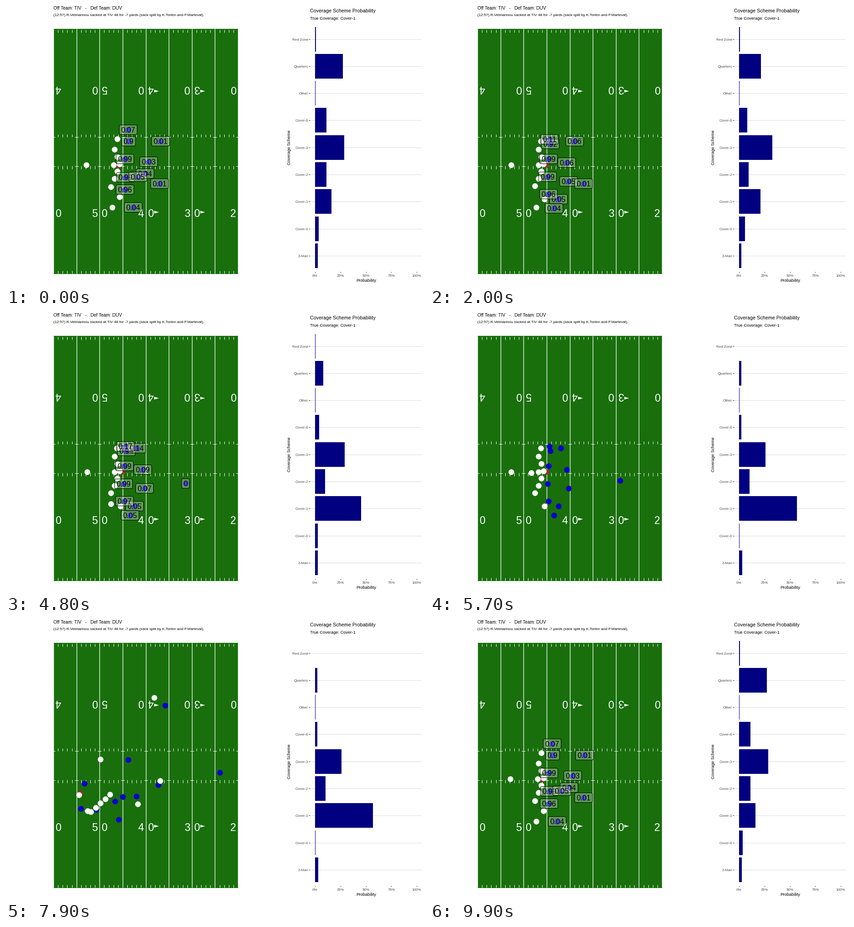
Recreate the animation shown at these times as a matplotlib script. Size 917 px wide and 611 px high, loop 10000 ms.

```python
import matplotlib.pyplot as plt
import numpy as np
from matplotlib.animation import FuncAnimation
from matplotlib.patches import FancyBboxPatch, Polygon, Rectangle

W, H, DPI = 917, 611, 64
PT = 72 / DPI
FRAMES, STEP = 100, 100
SNAP, SACK = 5.7, 7.9
GREEN, BLUE, BROWN, NAVY = "#196f0c", "#0000cd", "#a52a2a", "#000080"
LEFT, RIGHT, TOP, BOTTOM = 104, 509, 50, 587
YARD = (RIGHT - LEFT) / 40
PILE = np.array((165, 425))
ZERO, PERCENT = 678, 2.23

plt.rcParams["font.family"] = "Liberation Sans"
fig = plt.figure(figsize=(W / DPI, H / DPI), dpi=DPI, facecolor="white")
ax = fig.add_axes([0, 0, 1, 1])
ax.set(xlim=(0, W), ylim=(H, 0))
ax.axis("off")


def write(x, y, s, size, **kw):
    """Text on a pixel baseline, size in pixels."""
    kw = {"color": "black", "va": "baseline", "rotation_mode": "anchor", **kw}
    return ax.text(x, y, s, fontsize=size * PT, **kw)


def line(x, y, color="white", width=1.0, z=2):
    ax.plot(x, y, color=color, lw=width * PT, zorder=z, solid_capstyle="butt")


class Player:
    """Shifts into position, runs a curved route at the snap, then follows up.

    Without a bend the route is straight, speeding up from rest.
    """

    def __init__(self, start, ready, end, bend=None, shift=(0, 2), odds=(0, 0)):
        points = (start, ready, end, ready if bend is None else bend)
        self.start, self.ready, self.end, self.bend = np.array(points, float)
        self.shift, self.odds = shift, odds

    def at(self, t):
        if t < SNAP:
            return self.start + (self.ready - self.start) * np.interp(t, self.shift, (0, 1))
        u = min((t - SNAP) / (SACK - SNAP), 1)
        p = (1 - u) ** 2 * self.ready + 2 * u * (1 - u) * self.bend + u * u * self.end
        late = max(t - SACK, 0)
        if self.end[0] > 260:   # downfield: run on and slow down
            speed = 2 * (self.end - self.bend) / (SACK - SNAP)
            return p + speed * 0.7 * (1 - np.exp(-late / 0.7))
        return p + (PILE - p) * 0.5 * (1 - np.exp(-late))

    def label(self, t):
        return f"{round(float(np.interp(t, (0, 4.8), self.odds)), 2):g}"


def offensive_line():
    """Five blockers in a wedge who slide down and trail the quarterback."""
    ends = np.linspace((228, 382), (186, 420), 5)
    for i, end in enumerate(ends):
        x, y = 249 - 5.5 * abs(i - 2), 314 + 16 * i
        yield Player((x, y), (x, y), end, (x + 12, y + 8))


def rusher(start, ready, end, odds):
    """Slants up the line before turning after the ball."""
    return Player(start, ready, end, (ready[0], ready[1] - 40), odds=odds)


offense = [
    *offensive_line(),
    Player((244, 291), (243, 296), (207, 305), (257, 345)),
    Player((230, 396), (230, 394), (289, 403), (205, 396)),
    Player((249, 418), (251, 423), (338, 352)),
    Player((176, 348), (178, 348), (179, 418)),
    Player((236, 348), (238, 348), (160, 383), (222, 361)),
    Player((233, 441), (222, 350), (325, 170), (205, 243), shift=(4.5, SNAP)),
]
ball = Player((246, 349), (255, 348), (163, 379), (196, 370))

# Back to front, as the labels overlap
defense = [
    Player((269, 296), (264, 302), (268, 306), odds=(.9, .94)),
    rusher((261, 335), (260, 335), (256, 387), (.99, .99)),
    rusher((262, 375), (258, 374), (239, 397), (.99, .99)),
    Player((305, 367), (304, 384), (286, 386), odds=(.04, .07)),
    Player((289, 374), (282, 423), (247, 437), odds=(.05, .05)),
    rusher((261, 402), (260, 412), (198, 415), (.96, .97)),
    Player((339, 296), (287, 296), (349, 187), (321, 325), (0, 4.8), (.01, .14)),
    Player((313, 341), (300, 343), (334, 361), (261, 326), odds=(.03, .09)),
    Player((337, 389), (417, 367), (469, 334), (449, 352), (2.6, SNAP), (.014, 0)),
    Player((279, 441), (272, 443), (164, 413), (237, 394), odds=(.04, .05)),
    Player((268, 271), (262, 292), (172, 358), odds=(.07, .17)),
]

# Share in percent before the play and at the snap, and the swell in between
coverage = {
    "Red Zone": (.6, 0, .2),
    "Quarters": (27, 2, -2),
    "Other": (.1, .1, 0),
    "Cover-6": (10.8, 2.2, -1.7),
    "Cover-3": (28.4, 25.6, 5),
    "Cover-2": (10.8, 10.2, -1.5),
    "Cover-1": (16, 56.7, -1.5),
    "Cover-0": (3.3, .1, 3),
    "2-Man": (2.6, 3, -.8),
}


def share(t, first, last, swell):
    u = min(t / SNAP, 1)
    return max(first + (last - first) * u ** 1.8 + swell * np.sin(np.pi * u), 0)


def draw_field():
    field = Rectangle((LEFT, TOP), RIGHT - LEFT + 1, BOTTOM - TOP,
                      fc=GREEN, lw=0, zorder=1)
    ax.add_patch(field)
    for i in range(41):
        x = LEFT + i * YARD
        if i % 5 == 0:
            line((x, x), (TOP, BOTTOM - 1), width=1.3)
            for y in (287, 350.5):
                line((max(x - 4, LEFT), min(x + 4, RIGHT)), (y, y))
        else:
            for y in (51.5, 280.5, 350, 579.5):
                line((x, x), (y, y + 6.5))
    for k, n in enumerate((40, 50, 40, 30, 20)):
        x = LEFT + k * 10 * YARD
        for side, digit in zip((-1, 1), str(n)):
            if LEFT < x + side * 10.5 < RIGHT:
                write(x + side * 10.5, 461.5, digit, 23, color="white", ha="center")
            if LEFT < x - side * 10.5 < RIGHT:
                write(x - side * 10.5, 175, digit, 23, color="white",
                      ha="center", rotation=180)
        if k in (2, 3):
            for y in (186.5, 451.5):
                ax.add_patch(Polygon([(x + 18.5, y - 3), (x + 18.5, y + 3), (x + 29, y)],
                                     fc="white", lw=0, zorder=3))
    return field


def draw_chart():
    bars = {}
    for k, name in enumerate(coverage):
        y = 72.5 + 59.3 * k
        line((667, 912), (y, y), "#dcdcdc", 1.0, 1)
        line((664, 667), (y, y), "#333333", 1.0, 1)
        write(663, y + 3, name, 8, color="#4d4d4d", ha="right")
        bars[name] = ax.add_patch(Rectangle((ZERO - 0.5, y - 27), 0, 54,
                                            fc=NAVY, lw=0, zorder=2))
    for pct in range(0, 101, 25):
        x = ZERO + PERCENT * pct
        line((x, x), (581.5, 584), "#333333", 1.0, 1)
        write(x, 593, f"{pct}%", 8, color="#4d4d4d", ha="center")
    write(790, 604, "Probability", 9.4, ha="center")
    write(624, 309.5, "Coverage Scheme", 9.3, ha="center", rotation=90)
    write(667, 14, "Coverage Scheme Probability", 10.8)
    write(667, 30, "True Coverage: Cover-1", 9.3)
    return bars


def dots(color, size, z):
    art, = ax.plot([], [], "o", color=color, ms=size * PT, mew=0, zorder=z)
    art.set_clip_path(field)
    return art


class Tag:
    """Rounded label with a probability, centred on a player."""

    def __init__(self, z):
        self.box = ax.add_patch(FancyBboxPatch(
            (0, 0), 1, 1, boxstyle="round,pad=0,rounding_size=3",
            fc=(1, 1, 1, 0.3), ec="black", lw=PT, zorder=z))
        self.text = write(0, 0, "", 16, ha="center", zorder=z + 0.01)

    def show(self, x, y, s):
        wide = 8 + sum(4.4 if c == "." else 8.9 for c in s)
        self.box.set_bounds(x - wide / 2, y - 10.5, wide, 21)
        self.text.set_position((x, y + 5.8))
        self.text.set_text(s)

    def set_visible(self, on):
        self.box.set_visible(on)
        self.text.set_visible(on)


field = draw_field()
bars = draw_chart()
write(104, 8.5, "Off Team: TIV   -   Def Team: DUV", 10)
write(104, 22, "(12:57) R.Velmarinou sacked at TIV 48 for -7 yards "
      "(sack split by K.Torlen and P.Marteval).", 8.3)

blue_dots = dots(BLUE, 12.5, 5)
ball_dot = dots(BROWN, 11.5, 6)
white_dots = dots("white", 12.5, 7)
tags = [Tag(8 + 0.1 * i) for i in range(len(defense))]


def update(n):
    t = n * STEP / 1000 if n < FRAMES - 1 else 0
    spots = [d.at(t) for d in defense]
    blue_dots.set_data(*zip(*spots))
    white_dots.set_data(*zip(*(p.at(t) for p in offense)))
    ball_dot.set_data(*zip(ball.at(t)))
    for tag, d, (x, y) in zip(tags, defense, spots):
        tag.set_visible(t < SNAP)
        tag.show(x, y, d.label(t))
    for name, trend in coverage.items():
        value = share(t, *trend)
        bars[name].set_width(PERCENT * value + 1 if value > 0.01 else 0)
    return []


anim = FuncAnimation(fig, update, frames=FRAMES, interval=STEP,
                     repeat=True, repeat_delay=0, blit=False)
plt.show()
```
